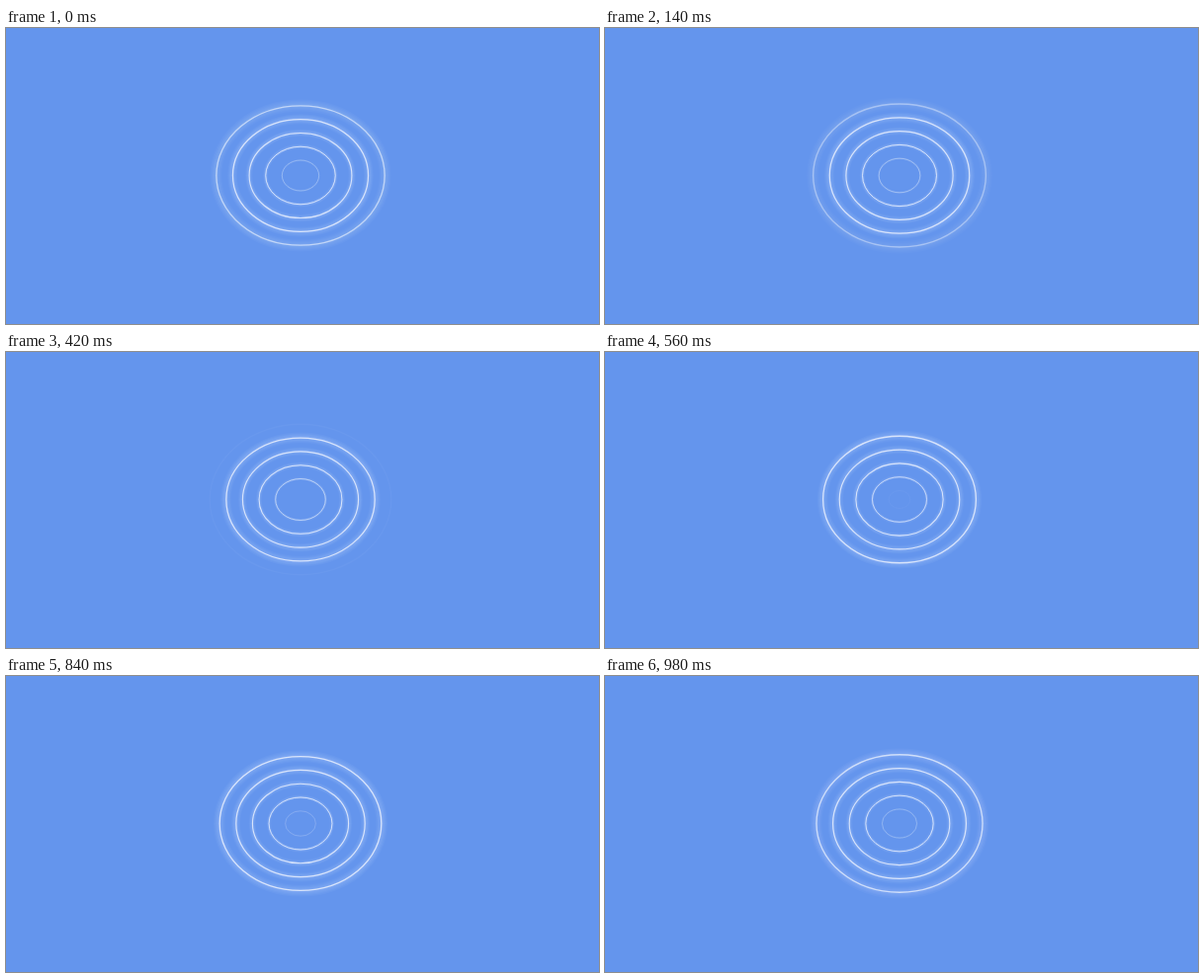
An HTML page with a canvas that plays this animation: 600 px wide and 300 px high, repeating every 1.05 s.

```html
<!DOCTYPE html>
<html lang="en">
<head>
<meta charset="utf-8">
<title>Ripples</title>
<style>
  html, body { margin: 0; width: 100%; height: 100%; overflow: hidden; background: #6495ed; }
  canvas { display: block; width: 600px; height: 300px; }
</style>
</head>
<body>
<canvas id="stage" width="600" height="300"></canvas>
<script>
const ctx = document.getElementById('stage').getContext('2d');
const LOOP = 1050, STEP = 70;
const CX = 298, CY = 149.5, RATIO = 0.83;
const GAP = 16.63, START = 2, MAX = 92.2;
const GLOW = [3, 5, 7.5, 10, 13];

const clamp = v => Math.max(0, Math.min(1, v));

function stroke(r, width, alpha) {
  ctx.globalAlpha = alpha;
  ctx.lineWidth = width;
  ctx.beginPath();
  ctx.ellipse(CX, CY, r, r * RATIO, 0, 0, Math.PI * 2);
  ctx.stroke();
}

function ring(r) {
  // fades in near the centre, fades out at the rim
  const fade = Math.min(clamp((r - 9.5) / 20), clamp((MAX - r) / 9));
  if (!fade) return;
  const s = r / MAX;
  for (const w of GLOW) stroke(r + 0.5 * s, w * s, 0.036 * fade);
  stroke(r, 0.7 + 0.7 * s, 0.7 * fade);
}

function draw(now) {
  const p = Math.floor((now % LOOP) / STEP) * STEP / LOOP;
  ctx.globalAlpha = 1;
  ctx.fillStyle = '#6495ed';
  ctx.fillRect(0, 0, 600, 300);
  ctx.strokeStyle = '#fff';
  for (let k = 0; k < 6; k++) ring(START + (k + p) * GAP);
}

const t0 = performance.now();
function tick() {
  draw(performance.now() - t0);
  requestAnimationFrame(tick);
}
tick();
</script>
</body>
</html>
```
